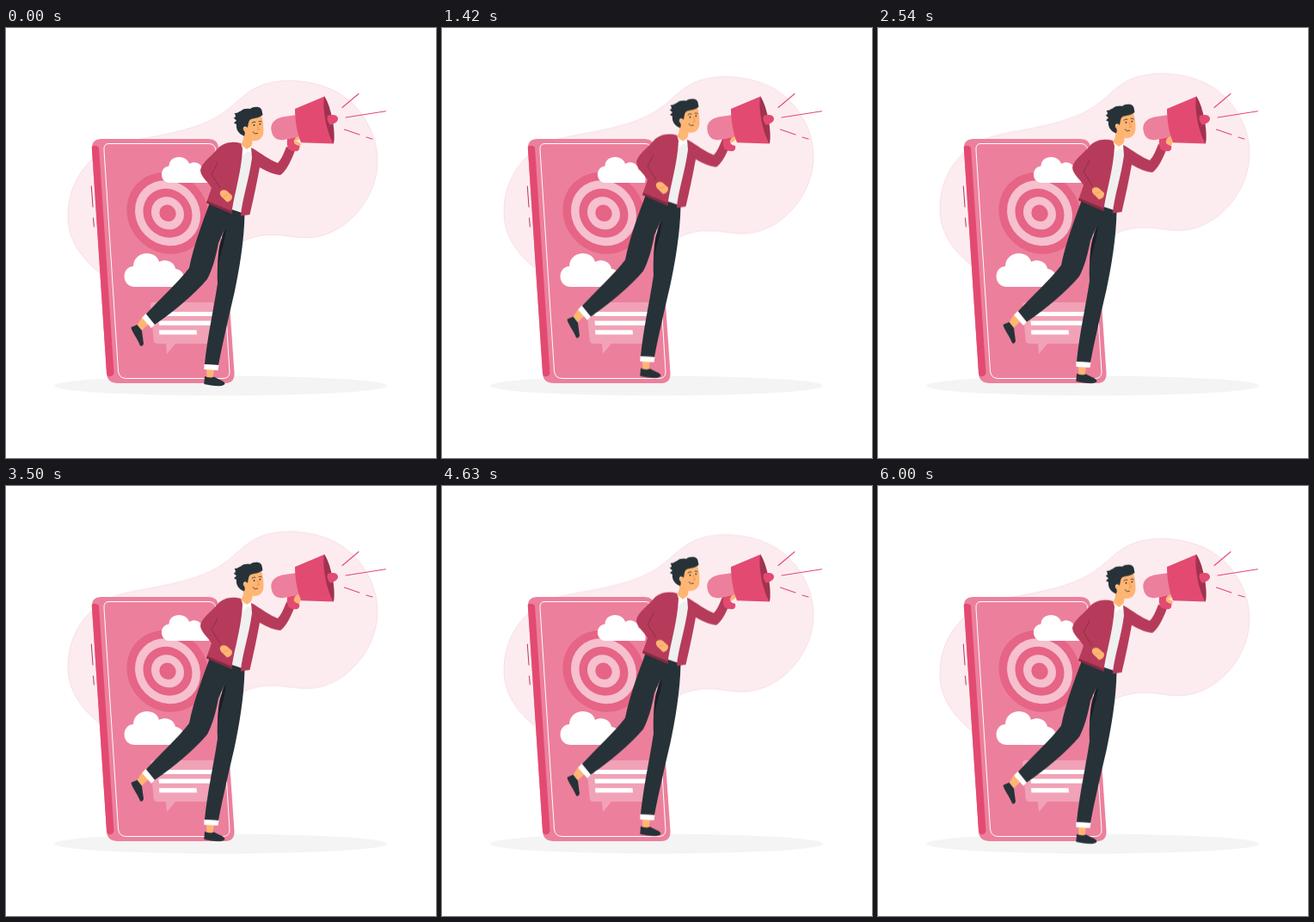
These frames come from a looping animation (500x500 px, 6040 ms). An HTML page:

```html
<!DOCTYPE html>
<html lang="en">
<head>
<meta charset="utf-8">
<title>Megaphone announcement</title>
<style>
  html, body { margin: 0; width: 100%; height: 100%; overflow: hidden; background: #fff; }
  svg { display: block; width: 100vw; height: 100vh; }
  .blob { animation: rise 3.02s linear infinite alternate; }
  .man { animation: rise 1.51s linear infinite alternate; }
  @keyframes rise { to { transform: translateY(-10px); } }

  .pink { fill: #e34a71; }
  .rose { fill: #ec809c; }
  .ring { fill: #e66486; }
  .pale { fill: #f6c0ce; }
  .white { fill: #fff; }
  .wine { fill: #b63b5a; }
  .dark { fill: #263238; }
  .skin { fill: #ffb573; }
  .line { fill: none; stroke-linecap: round; stroke-linejoin: round; }
</style>
</head>
<body>
<svg viewBox="0 0 500 500">
  <path class="blob" fill="#fcecf0" stroke="#f0b3c3" stroke-width=".35"
    d="M72 219C72 190 84 168 100 153C116 137 137 133 157 129C190 123 222 117 246 103C266 91 276 75 296 67C318 58.500 346 60 370 68C404 79 432 114 432 155C432 193 403 233 365 242C344 247 327 240 309 240.500C288 240.500 269 248 250 266C220 298 150 320 108 284C85 265 72 244 72 219Z"/>
  <ellipse cx="249.5" cy="416" rx="193.5" ry="11.5" fill="#f4f4f4"/>

  <g id="phone">
    <path class="rose" d="M111 129H236Q246 129 247.500 140L265.500 401Q266 413 255 413H130Q118 413 117 402L99.800 140Q99.800 129 111 129Z"/>
    <path class="pink" d="M99.800 138Q104 135 108 139L125.500 401Q124.500 406 119.500 405Q117 404 117 401Z"/>
    <path class="line" stroke="#fff" d="M119 134.500H236Q243 134.500 244 142L260 400Q260 407.500 252 407.500H140Q131.500 407.500 130.500 399L114 142Q113.500 134.500 119 134.500Z"/>
    <path class="line" stroke="#b63b5a" d="M99.300 184L101 208M101.500 221L102.300 231"/>

    <g transform="translate(188 215.300) rotate(45) scale(1.04 .96)">
      <circle class="ring" r="47.500"/>
      <circle class="pale" r="38"/>
      <circle class="ring" r="28.500"/>
      <circle class="pale" r="19"/>
      <circle class="ring" r="9.700"/>
    </g>

    <path class="white" d="M190 180C178 179 178 162 189.500 160.500C190 147 210 147 213 158C220 153.500 228 158 228.500 165C235 166 238 174 236 180Z"/>
    <path class="white" d="M149 301C134 300 134 278 148 277C149 258 175 258 178 272C187 267.500 196 273 197 280C204 281 208 287 206 290C209 294 208 300 207 301Z"/>

    <path fill="#f1a2b6" d="M171 319H241L245 364Q245 367 242 367H197L187 379L186 367H176Q172 367 171.700 363L168 323Q168 319 171 319Z"/>
    <path class="white" d="M177 330H241V335H177ZM177.500 340.500H240V345.700H178ZM178 351.300H221.500L222 356.500H178.400Z"/>
  </g>

  <g class="man">
    <g id="legs">
      <path class="skin" d="M159 335L166 344L158 351.500L152 346ZM233 396H242L240.500 407H233.500Z"/>
      <path class="dark" d="M145.500 348L152.500 345L158 352L160 367C159 370.500 156 371 155 367C152 360 146 353 145.500 348ZM231 405Q237 407.500 242 405.500C246 408.500 254.500 410 254.500 414C252 418 238 416 230.300 414Z"/>
      <path class="dark" d="M237 203C229 225 219 250 213 279C200 296 180 314 162.500 333L172 345.500C195 330 220 309 234 292C240 281 244 266 247 250L264 212Z"/>
      <path class="dark" d="M245 205L277.500 216C277 248 271 282 265.500 308C259 336 252 366 247 392L231 391C234 360 241 330 246 297C245 275 247 255 255 230Z"/>
      <path fill="#172126" d="M256 233C249 244 246 260 246.500 279C248 263 254 254 256 233Z"/>
      <path class="white" d="M162.500 332L173 345L169 349L158.200 337ZM230.500 391L247.500 392L246.500 398L230.300 397Z"/>
    </g>

    <g id="torso">
      <path fill="#f0f0f0" d="M273 138L286 138L289 152L276 212L262 211Z"/>
      <path class="skin" d="M276 122L287 130L285 139Q281 144 278 141L273 135Q277 131 276 122Z"/>
      <path class="white" d="M272 135L280 141L286 137L288 147L281 143L275 149Z"/>
      <path class="wine" d="M273 134C262 131 252 134 246.500 140C239 149 228 156 226 165C226 173 236 180 239 186L233 203L262.500 216C264 198 274 168 275 140Z"/>
      <path fill="#852b43" d="M234 201L263 213L262.500 216L233 203.500Z"/>
      <path class="line" stroke="#852b43" stroke-width=".8" d="M246 157Q242 165 239 170Q244 178 249 186"/>
      <path class="skin" d="M249 190.500Q252 186.500 257 189.500L263 195Q263.500 201 257 202.500L252 197.500Q248 194.500 249 190.500Z"/>
      <path class="line" stroke="#e6924c" stroke-width=".6" d="M253 195.500L258 194.500"/>
      <path class="wine" d="M285 139L286 151C283 175 274 201 273 218.500L283.500 217C288 198 292 178 295 162C303 167 314 171 319 171C325 168 333 152 336 142L326 138C323 146 320 153 316 157C307 154 296 145 285 139Z"/>
      <path class="skin" d="M328 140L333 132Q339 130 343 135L341 140L336 143Z"/>
    </g>

    <g id="head">
      <path class="skin" d="M278 113C281 104 290 101 297 102C299 108 299.800 116 299.300 122C298 130 291 132.500 286 130.500C281 129 278 126 277 123C272 121 273 114 278 116Z"/>
      <path class="dark" d="M277 125.500C271 124 267 118 268 112L265 110.500L268 107.500L264.500 104.500C268 104 267 101 265.500 99C270 99 270 97.500 273 96.500C276 93.500 280 93.500 284 94C288 90.500 297 91 297.500 96L298.500 101C294 105 289 104.500 285 106C282 107 282 111 281 116C278 113 275 115 276 118.500Q279 121 277 125.500Z"/>
      <g class="dark"><circle cx="288.500" cy="113" r=".9"/><circle cx="295.300" cy="111.700" r=".9"/></g>
      <path class="line" stroke="#263238" stroke-width=".8" d="M286 110.300Q288 108.300 290 109.300M294 108.500Q295.800 107.700 297.300 109M287 121Q289 124 292.500 122.500"/>
      <path class="line" stroke="#ed893e" stroke-width=".8" d="M292 113L294.500 118L292 118.500"/>
    </g>
  </g>

  <g id="megaphone">
    <path class="skin" d="M335 127L341 126.500L342 129L336 132Z"/>
    <path class="pink" d="M327 129L338 126.500Q334 130 335 134Q338 137 341 137Q342 141 339 143Q332 144 328 140Q326 135 327 129Z"/>
    <path class="rose" d="M338 101L321 103.500C310.500 106 306.500 113 309 121C310.500 128 316 131 323 130L343 126Z"/>
    <path class="pink" d="M336 94L370.500 79.500L381 134.500L343 133.300C338 121 336 106 336 94Z"/>
    <path fill="#a03250" d="M370 79.500C376 86 384 117 381 134.500C376 129 367 99 370 79.500Z"/>
    <path class="pink" d="M374 102C379 100 386 101 386 105.500C386 110 381 111 377 113Q372 107 374 102Z"/>
    <path class="line" stroke="#e34a71" stroke-width="1.100" d="M391 92.500L410 76.500M395 104L441.500 96.800M393.500 118L411 124M419 127L426 129"/>
  </g>
</svg>
</body>
</html>
```
